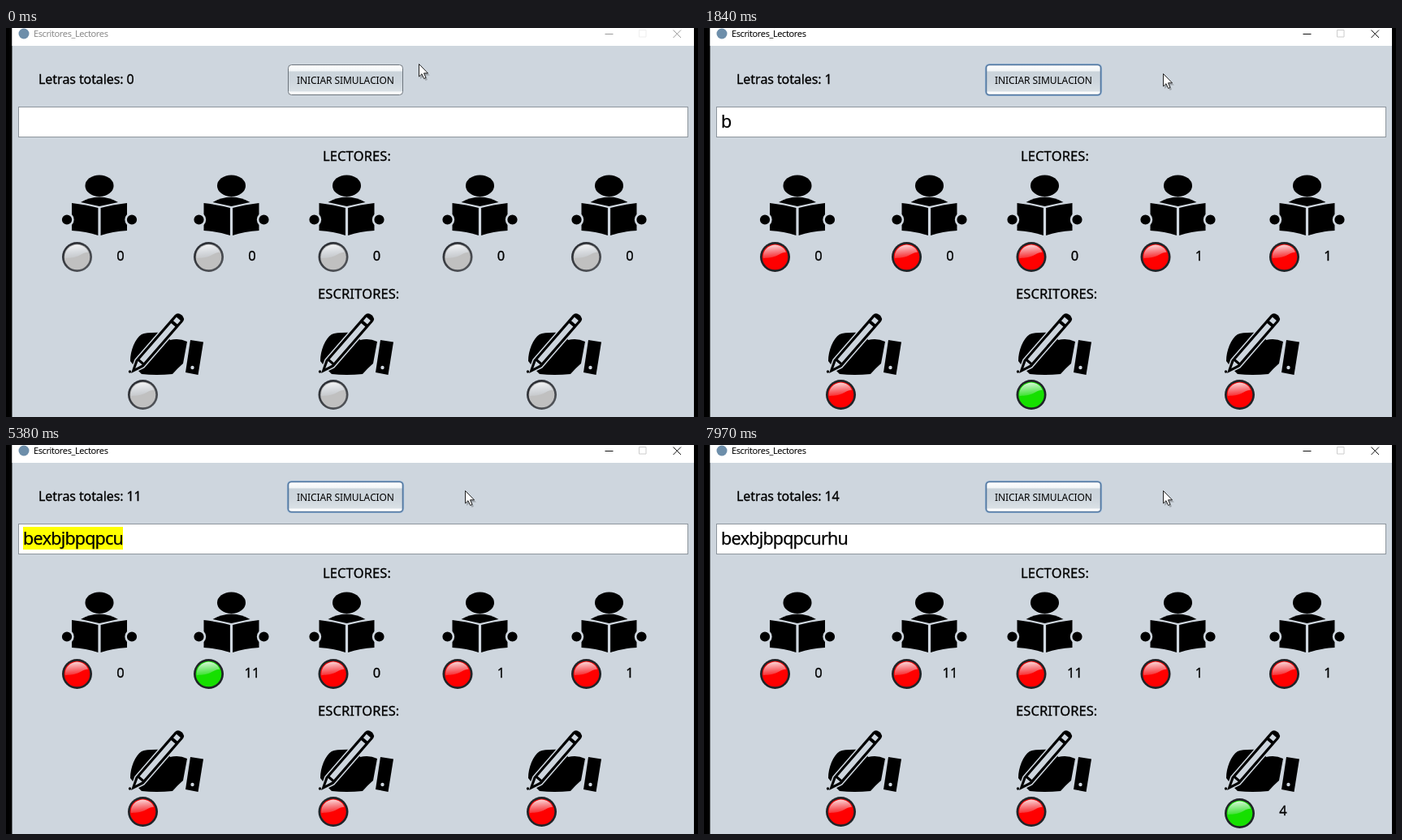
An HTML page that plays this animation: 852 by 480 pixels, repeating every 8000 ms.

```html
<!DOCTYPE html>
<html lang="es">
<head>
<meta charset="utf-8">
<title>Escritores_Lectores</title>
<style>
  html, body { margin: 0; width: 852px; height: 480px; overflow: hidden; background: #000; }
  body { position: relative; }
  svg { position: absolute; left: 0; top: 0; display: block; }
  svg text, #field { font-family: "Noto Sans", "Open Sans", sans-serif; font-kerning: none; fill: #000; }
  #field {
    position: absolute; left: 21px; top: 101px; height: 28px; line-height: 28px;
    font-size: 21.5px; letter-spacing: -.82px; white-space: nowrap; color: #000;
    -webkit-text-stroke: .25px #000;
  }
  #mark { display: inline-block; background: #ff0; }
  .label, .head, .num { stroke: #000; stroke-width: .3px; }
  .label { font-size: 16px; letter-spacing: -.1px; }
  .head { font-size: 16.5px; letter-spacing: .08px; }
  .num { font-size: 16.5px; text-anchor: middle; }
  #title { font-size: 11px; letter-spacing: -.42px; }
  .chrome { fill: none; stroke: #111; stroke-width: 1; }
  .idle .chrome { stroke: #999; }
  .idle #title { fill: #8a8a8a; }
  .chrome.dim { stroke: #ccc; }
  .idle .chrome.dim { stroke: #eee; }
  .off { color: #c0c0c0; --rim: url(#rimOff); }
  .red { color: #f00; --rim: #202428; }
  .green { color: #16e000; --rim: #202428; }
  .rim { fill: var(--rim); }
  #face { fill: url(#normal); stroke: #6c747c; }
  .focus #face { stroke: #55789f; stroke-width: 1.6; }
  .hover #face { fill: url(#bright); }
  .press #face { fill: #aeb9c4; }
  #glow { fill: none; stroke: #8fb0d2; stroke-width: 1.2; visibility: hidden; }
  .focus #glow { visibility: visible; }
</style>
</head>
<body>
<svg id="stage" width="852" height="480" viewBox="0 0 852 480">
  <defs>
    <linearGradient id="normal" x2="0" y2="1">
      <stop offset="0" stop-color="#fff"/><stop offset=".2" stop-color="#f2f5f7"/>
      <stop offset=".23" stop-color="#cbd4db"/><stop offset=".55" stop-color="#ced6dd"/>
      <stop offset=".87" stop-color="#d9e0e5"/><stop offset=".91" stop-color="#fbfcfd"/>
      <stop offset="1" stop-color="#fff"/>
    </linearGradient>
    <linearGradient id="bright" x2="0" y2="1">
      <stop offset="0" stop-color="#fff"/><stop offset=".25" stop-color="#f7f9fa"/>
      <stop offset=".6" stop-color="#eff2f5"/><stop offset="1" stop-color="#fff"/>
    </linearGradient>
    <linearGradient id="rimOff" x2=".8" y2="1">
      <stop offset="0" stop-color="#22252b"/><stop offset="1" stop-color="#54575c"/>
    </linearGradient>
    <linearGradient id="gloss" x2=".15" y2="1">
      <stop offset="0" stop-color="#fff" stop-opacity=".88"/>
      <stop offset="1" stop-color="#e4f0ff" stop-opacity=".18"/>
    </linearGradient>

    <g id="light">
      <circle class="rim" r="18.5"/>
      <circle r="15.8" fill="currentColor"/>
      <path d="M-14.7 2A14.8 14.8 0 0 1 13.6 -5.8C7 -5.5 4 -1.5 -3 .2S-12 .5 -14.7 2Z" fill="url(#gloss)"/>
    </g>

    <g id="reader">
      <ellipse cy="-41.8" rx="17.5" ry="13.2"/>
      <path d="M-23 -21.5Q-12 -28 0 -28T23 -21.5L0 -16.5Z"/>
      <path id="page" d="M-34 -20.5Q-16 -18.5 -1.6 -14.500V19.5Q-16 14.5 -34 13.5Z"/>
      <use href="#page" transform="scale(-1 1)"/>
      <g stroke="#ced6de" stroke-width="2.6">
        <circle cx="-40" r="7.4"/><circle cx="40" r="7.4"/>
      </g>
    </g>

    <g id="writer">
      <path d="M2 57C2 44 8 29 16 24Q22 21 46 22L51 31Q62 28 72 33L67 60Q60 66 54 73Q34 75 16 73L9 66Z"/>
      <path d="M76 31L92 33.5L85.5 74L70 71Z"/>
      <circle cx="78.5" cy="65" r="2.2" fill="#ced6de"/>
      <g transform="translate(3 72) rotate(-49)">
        <path d="M0 0L16 -6.5H89Q95 -6.5 95 0T89 6.5H16Z" stroke="#ced6de" stroke-width="3" paint-order="stroke"/>
        <path d="M8 0L17 -3.4V3.4ZM20 -3.3H79V3.3H20ZM83 -3.3H89V3.3H83Z" fill="#ced6de"/>
      </g>
      <circle cx="1.5" cy="70" r="1.7"/>
    </g>
  </defs>

  <path d="M7.500 0H847V480H7.500Z" fill="#ced6de"/>
  <path d="M7.500 0H847V22H7.500Z" fill="#fff"/>
  <circle cx="22" cy="7" r="6.500" fill="#6d8eaa"/>
  <text id="title" x="34" y="11">Escritores_Lectores</text>
  <path class="chrome" d="M737.500 7.500H747.500M821.500 2.500L831 12M831 2.500L821.500 12"/>
  <path class="chrome dim" d="M779.500 2.500H788V11H779.500Z"/>

  <text id="total" class="label" x="40" y="69"></text>
  <g id="button">
    <rect id="glow" x="346.500" y="44.500" width="143" height="39" rx="5"/>
    <rect id="face" x="347.500" y="45.500" width="141" height="37" rx="4"/>
    <text x="418" y="69.300" text-anchor="middle" font-size="12" letter-spacing="-.1">INICIAR SIMULACION</text>
  </g>
  <rect x="15.500" y="97.500" width="824" height="37" fill="#fff" stroke="#8d959d"/>
  <text class="head" x="390" y="164">LECTORES:</text>
  <text class="head" x="384" y="334">ESCRITORES:</text>
  <g id="people"></g>
</svg>
<div id="field"><span id="mark"></span><span id="rest"></span></div>
<svg width="852" height="480" viewBox="0 0 852 480">
  <g id="cursor">
    <path d="M2 3V19L6 15.500L8.500 21L11 20L8.700 14.500H14Z" fill="#000" opacity=".22"/>
    <path d="M.5 .5V16L4 12.700L6.600 18.500L9 17.400L6.500 11.800H11.500Z" fill="#fff" stroke="#222"/>
  </g>
</svg>
<script>
const LOOP = 8000;
const WORD = "bexbjbpqpcurhu";
const $ = id => document.getElementById(id);

// Evenly spaced times, each shifted by an optional delay.
const ticks = (start, n, delay = () => 0) =>
  Array.from({ length: n }, (_, i) => start + 160 * i + delay(i));
const passed = (times, t) => times.filter(x => x <= t).length;
// Value of the last [time, value] pair already reached.
const latest = (pairs, t) => pairs.reduce((v, p) => p[0] <= t ? p[1] : v, "");
const countdown = (start, from, n, end) =>
  [...ticks(start, n).map((x, i) => [x, from - i]), [end, ""]];
const countup = times => [[0, 0], ...times.map((x, i) => [x, i + 1])];

const typed = [1000, ...ticks(1970, 6), 2960, 3060, 3250, 3410, 7650, 7840, 7970];
const read2 = [3760, ...ticks(3860, 10, i => i > 5 ? -10 : 0)];
const read3 = [5670, ...ticks(5870, 7), 6960, 7160, 7320];

// Each highlight: times its letters light up, then the time it clears.
const marks = [
  [[1280], 1510],
  [[3760, 3860, ...ticks(4050, 3), 4560, 4690, 4870, 5030, 5160, 5380], 5540],
  [[5670, 5900, ...ticks(6030, 5), 6830, 6960, 7190, 7350], 7480]
];

const lamp = (on, ...turns) => [[0, "off"], [on, "red"],
  ...turns.map((x, i) => [x, i % 2 ? "red" : "green"])];

// icon x, lamp x, lamp states, counter values
const readers = [
  [115, 87.5, lamp(850), [[0, 0]]],
  [277.5, 249.5, lamp(880, 3600, 5540), countup(read2)],
  [419.5, 403, lamp(910, 5540, 7480), countup(read3)],
  [583.5, 556, lamp(1000, 1150, 1840), countup([1280])],
  [742.5, 714.5, lamp(1030, 1150, 1640), countup([1310])]
];
const writers = [
  [151, 168.5, lamp(760, 1000, 1150), []],
  [385, 403, lamp(790, 1840, 3540), countdown(1940, 9, 10, 3540)],
  [641, 659.5, lamp(820, 7480), countdown(7650, 6, 3, LOOP)]
];

const path = [
  [0, 508, 44], [60, 508, 44], [220, 514, 47], [450, 514, 47],
  [620, 470, 60], [760, 470, 60], [970, 561, 57], [1150, 565, 56], [LOOP, 565, 56]
];

function add(tag, attrs) {
  const el = document.createElementNS("http://www.w3.org/2000/svg", tag);
  for (const k in attrs) el.setAttribute(k, attrs[k]);
  return $("people").appendChild(el);
}

function person(kind, iconY, y, [iconX, x, states, counts]) {
  add("use", { href: "#" + kind, x: iconX, y: iconY });
  const light = add("use", { href: "#light", x });
  const num = add("text", { class: "num", x: x + 53.5, y: y + 4.5 });
  return t => {
    const n = latest(counts, t);
    num.textContent = n;
    light.setAttribute("class", latest(states, t));
    // A visible counter pushes a writer's lamp down.
    light.setAttribute("y", y + (kind === "writer" && n !== "" ? 2 : 0));
  };
}

const people = [
  ...readers.map(r => person("reader", 236.5, 282.5, r)),
  ...writers.map(w => person("writer", 354, 452.5, w))
];

function moveCursor(t) {
  const i = path.findIndex(p => p[0] > t);
  const [a, b] = [path[i - 1], path[i]];
  const k = (t - a[0]) / (b[0] - a[0]);
  const at = j => Math.round(a[j] + (b[j] - a[j]) * k);
  $("cursor").setAttribute("transform", `translate(${at(1)} ${at(2)})`);
}

function draw(t) {
  const total = passed(typed, t);
  const marked = marks.reduce((n, [times, end]) => t < end ? n + passed(times, t) : n, 0);
  $("total").textContent = "Letras totales: " + total;
  $("mark").textContent = WORD.slice(0, marked);
  $("rest").textContent = WORD.slice(marked, total);
  $("stage").setAttribute("class", t < 670 ? "idle" : "");
  $("button").setAttribute("class", latest(
    [[540, "hover"], [670, "focus press"], [760, "focus hover"], [1060, "focus"]], t));
  people.forEach(update => update(t));
  moveCursor(t);
}

const began = performance.now();
function frame() {
  draw((performance.now() - began) % LOOP);
  requestAnimationFrame(frame);
}
frame();
</script>
</body>
</html>
```
